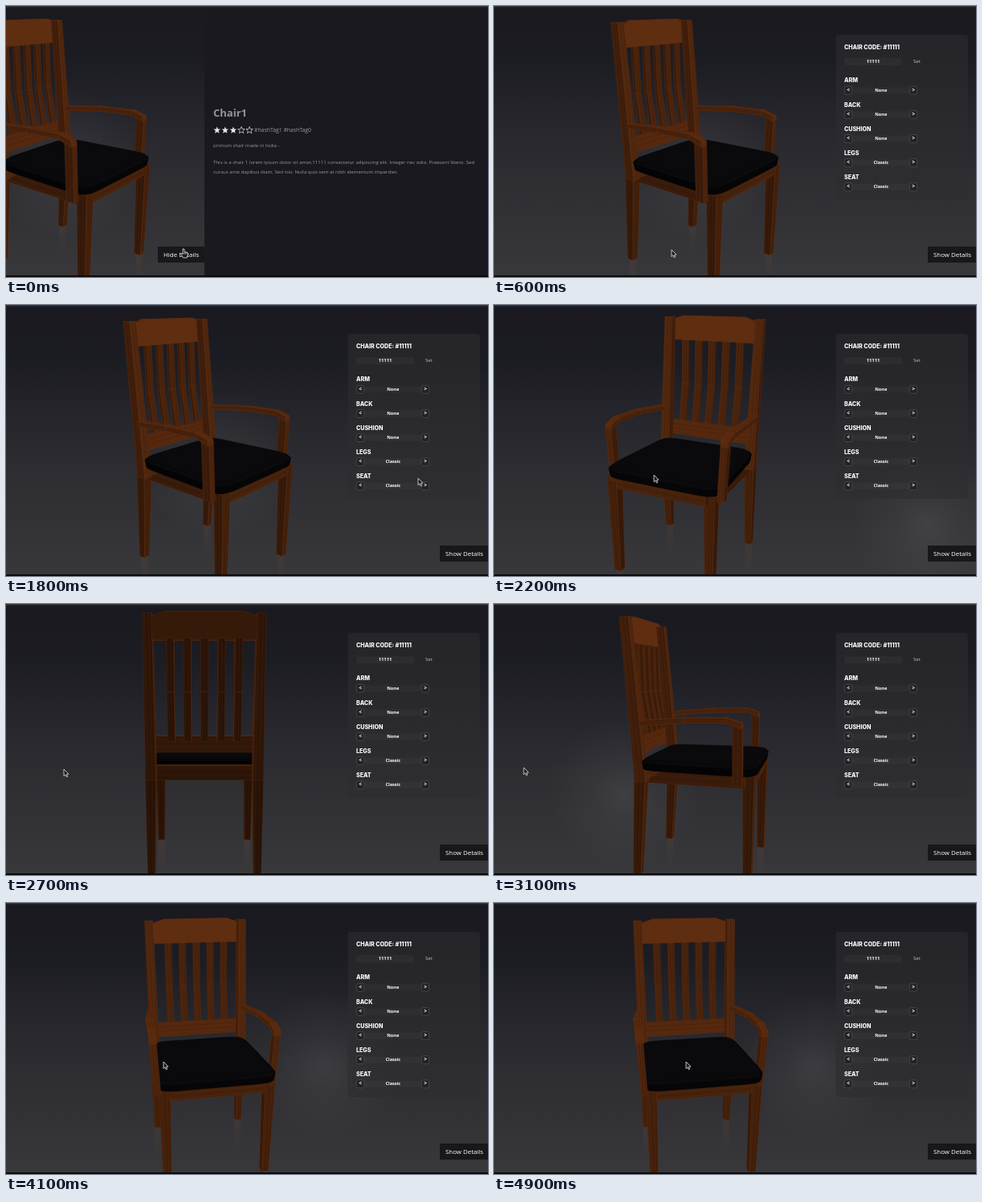
An HTML page with a canvas that plays this animation: 600x338 px, repeating every 5 s.

```html
<!DOCTYPE html>
<html lang="en">
<head>
<meta charset="utf-8">
<title>Chair configurator</title>
<style>
html, body { margin: 0; width: 100%; height: 100%; overflow: hidden; background: #1a191f; }
canvas { display: block; width: 600px; height: 338px; }
</style>
</head>
<body>
<canvas id="stage" width="600" height="338"></canvas>
<script>
const ctx = document.getElementById('stage').getContext('2d');
const LOOP = 5000, STEP = 100, HIDE_AT = 600;
const EYE_DISTANCE = 560, AXIS_X = 247, AXIS_Y = 168, DETAILS_SHIFT = -176.5;
const UI = '"Open Sans", "Noto Sans", sans-serif';
const HEADING = 'Inter, sans-serif';
const WOOD = [100, 48, 17], LEATHER = [12, 12, 15];

// time, yaw, pitch, zoom
const viewTrack = [
  [0, 51, 16, 1.045], [1700, 51, 16, 1.045], [1800, 48, 16, 1.045],
  [2200, -26, 18, 1.05], [2400, -92, 13, 1.05], [2700, -180, 6, 1.045],
  [2900, -235, 7, 1.045], [3100, -285, 8, 1.045], [3500, -290, 8, 1.04],
  [3700, -298, 11, 1.03], [4000, -343, 19, 1], [4100, -349, 20, 1], [4900, -350, 20, 1]
];
// time, x, y
const cursorTrack = [
  [0, 221, 304], [600, 221, 304], [1100, 318, 290], [1700, 385, 215],
  [1800, 513, 216], [2200, 199, 212], [2700, 72, 206], [2900, 12, 206],
  [3100, 37, 204], [3500, 482, 203], [3600, 482, 203], [4100, 196, 198],
  [4400, 497, 200], [4700, 310, 199], [4900, 239, 198]
];

function sample(track, t) {
  const i = track.findIndex(row => row[0] > t);
  if (i < 0) return track[track.length - 1].slice(1);
  const a = track[i - 1], b = track[i], f = (t - a[0]) / (b[0] - a[0]);
  return a.slice(1).map((v, j) => v + (b[j + 1] - v) * f);
}

// ---- vectors ----
const add = (a, b, m = 1) => a.map((v, i) => v + b[i] * m);
const dot = (a, b) => a[0] * b[0] + a[1] * b[1] + a[2] * b[2];
const cross = (a, b) => [a[1] * b[2] - a[2] * b[1], a[2] * b[0] - a[0] * b[2], a[0] * b[1] - a[1] * b[0]];
const mean = ps => ps.reduce((s, p) => add(s, p), [0, 0, 0]).map(v => v / ps.length);
const mix = (a, b, f) => add(a, add(b, a, -1), f);

// ---- model: x right, y up, z towards the front ----
function solid(ring0, ring1, color = WOOD, tone = 1) {
  const faces = ring0.map((p, i) => {
    const j = (i + 1) % ring0.length;
    return [p, ring0[j], ring1[j], ring1[i]];
  });
  faces.push(ring0, ring1);
  const center = mean([...ring0, ...ring1]);
  return { center, color, tone, faces: faces.map(points => {
    const mid = mean(points);
    let n = cross(add(points[1], points[0], -1), add(points[2], points[0], -1));
    const len = Math.hypot(...n) || 1;
    const sign = dot(n, add(mid, center, -1)) < 0 ? -1 : 1;
    return { points, mid, normal: n.map(v => v * sign / len) };
  }) };
}
function box(a, b, u, v, taper = 1, tone = 1) {
  const ring = (c, m) => [[-1, -1], [1, -1], [1, 1], [-1, 1]].map(([i, j]) => add(add(c, u, i * m), v, j * m));
  return solid(ring(a, taper), ring(b, 1), WOOD, tone);
}
const X = n => [n, 0, 0], Y = n => [0, n, 0], Z = n => [0, 0, n];
const backZ = y => -42 - 16 * (y + 25) / 164;
const sides = [-1, 1];

const frame = [
  ...sides.flatMap(s => [
    box([59 * s, -148, -48], [59 * s, -25, -42], X(6), Z(6.5), .68, .76),
    box([59 * s, -148, 77], [59 * s, -28, 77], X(6), Z(6), .72, .76),
    box([58 * s, -34, -38], [58 * s, -34, 72], X(4), Y(7.5), 1, .8)
  ]),
  box([-54, -34, 77], [54, -34, 77], Y(7), Z(4), 1, .8)
];

function crest() {
  const outline = [[-55, 110], [55, 110], [55, 134], [40, 139], [-40, 139], [-55, 134]];
  const ring = dz => outline.map(([x, y]) => [x, y, backZ(y) + dz]);
  return solid(ring(-3), ring(3), WOOD, 1.06);
}
const slats = [-36, -18, 0, 18, 36].flatMap(x => {
  const at = (y, bow) => [x, y, backZ(y) - bow];
  return [box(at(2, 0), at(56, 4), X(4), Z(2), 1, .82), box(at(56, 4), at(112, 0), X(4), Z(2), 1, .82)];
});
const back = [
  box([-56, -33, -43], [56, -33, -43], Y(8), Z(4), 1, .85),
  ...slats,
  box([-55, -1, backZ(0)], [55, -1, backZ(0)], Y(9), Z(3), 1, .95),
  crest(),
  ...sides.map(s => box([59 * s, -41, -42], [59 * s, 137, backZ(137)], X(4.8), Z(5.2), 1.2, .9))
];
const arms = sides.map(s => ({ side: s, parts: [
  box([66 * s, -38, 66], [69 * s, 26, 66], X(3.5), Z(5), 1, .85),
  box([62 * s, 24, -42], [68 * s, 29, 10], X(4), Y(2.8)),
  box([68 * s, 29, 10], [69 * s, 30, 54], X(4), Y(2.8)),
  box([69 * s, 30, 54], [69 * s, 25, 70], X(4), Y(3))
] }));

const round = v => Math.sign(v) * Math.abs(v) ** .22;
const cushionRing = (y, grow) => Array.from({ length: 56 }, (_, i) => {
  const a = i / 56 * Math.PI * 2, u = round(Math.cos(a)), v = round(Math.sin(a));
  return [u * (65 + 3 * v + grow), y, 20 + v * (64 + grow)];
});
const cushion = [
  solid(cushionRing(-28, 0), cushionRing(-20, 1), LEATHER, .55),
  solid(cushionRing(-20, 1), cushionRing(-17, -2), LEATHER, 1)
];

// ---- camera and painting ----
function makeCamera([yaw, pitch, zoom], cx) {
  const r = Math.PI / 180;
  const s = Math.sin(yaw * r), c = Math.cos(yaw * r), sp = Math.sin(pitch * r), cp = Math.cos(pitch * r);
  return {
    front: c > 0,
    eye: [-s * cp, sp, c * cp].map(v => v * EYE_DISTANCE),
    project([x, y, z]) {
      const px = x * c + z * s, pz = z * c - x * s;
      const scale = zoom * EYE_DISTANCE / (EYE_DISTANCE - pz * cp - y * sp);
      return [cx + px * scale, AXIS_Y - (y * cp - pz * sp) * scale];
    }
  };
}
function trace(points) {
  ctx.beginPath();
  points.forEach(p => ctx.lineTo(...p));
  ctx.closePath();
}
function line(a, b) {
  ctx.beginPath();
  ctx.moveTo(...a);
  ctx.lineTo(...b);
  ctx.stroke();
}
function grain(cam, q) {
  for (let i = 1; i < 5; i++) {
    const f = i / 5 + .06 * Math.sin(i * 7 + q[0][1]);
    ctx.strokeStyle = i % 2 ? 'rgba(30,10,2,.16)' : 'rgba(150,75,30,.12)';
    const long = Math.hypot(...add(q[1], q[0], -1)) > Math.hypot(...add(q[3], q[0], -1));
    const [a, b, c, d] = long ? [q[0], q[3], q[1], q[2]] : [q[0], q[1], q[3], q[2]];
    line(cam.project(mix(a, b, f)), cam.project(mix(c, d, f)));
  }
}
function paint(cam, part) {
  ctx.lineWidth = .6;
  for (const face of part.faces) {
    if (dot(face.normal, add(cam.eye, face.mid, -1)) <= 0) continue;
    const [, ny, nz] = face.normal;
    const light = part.tone * (.7 + .18 * nz + .15 * ny);
    const fill = `rgb(${part.color.map(v => Math.round(v * light)).join()})`;
    trace(face.points.map(cam.project));
    ctx.fillStyle = fill;
    ctx.fill();
    ctx.strokeStyle = part.color === WOOD ? 'rgba(112,56,22,.4)' : fill;
    ctx.stroke();
    if (part.color === WOOD && face.points.length === 4) grain(cam, face.points);
  }
}
function paintSorted(cam, parts) {
  const distance = p => Math.hypot(...add(p.center, cam.eye, -1));
  [...parts].sort((a, b) => distance(b) - distance(a)).forEach(p => paint(cam, p));
}
function paintReflections(cam) {
  for (const x of [-59, 59]) for (const z of [-48, 77]) {
    const [px, py] = cam.project([x, -148, z]);
    const g = ctx.createLinearGradient(0, py, 0, py + 38);
    g.addColorStop(0, 'rgba(110,70,50,.22)');
    g.addColorStop(1, 'rgba(110,70,50,0)');
    ctx.fillStyle = g;
    ctx.fillRect(px - 4, py - 2, 8, 40);
  }
}
function paintFloorGlow(cam) {
  const [x, y] = cam.project([270, -148, -206]);
  const g = ctx.createRadialGradient(x, y, 0, x, y, 95);
  g.addColorStop(0, 'rgba(255,255,255,.075)');
  g.addColorStop(.4, 'rgba(255,255,255,.035)');
  g.addColorStop(1, 'rgba(255,255,255,0)');
  ctx.fillStyle = g;
  ctx.fillRect(x - 95, y - 95, 190, 190);
}
function paintChair(cam) {
  const isNear = arm => arm.side * cam.eye[0] > 60;
  const far = arms.filter(a => !isNear(a)).flatMap(a => a.parts);
  const near = arms.filter(isNear).flatMap(a => a.parts);
  paintReflections(cam);
  paintSorted(cam, frame);
  if (cam.front) back.forEach(p => paint(cam, p));
  paintSorted(cam, far);
  cushion.forEach(p => paint(cam, p));
  paintSorted(cam, near);
  if (!cam.front) paintSorted(cam, back);
}

// ---- interface ----
function rect(x, y, w, h, fill, radius = 0, stroke) {
  ctx.beginPath();
  ctx.roundRect(x, y, w, h, radius);
  ctx.fillStyle = fill;
  ctx.fill();
  if (stroke) { ctx.strokeStyle = stroke; ctx.lineWidth = .6; ctx.stroke(); }
}
function text(str, x, y, font, color = '#fff', align = 'left') {
  ctx.font = font;
  ctx.fillStyle = color;
  ctx.textAlign = align;
  ctx.textBaseline = 'middle';
  ctx.fillText(str, x, y);
}
function button(label, x, w) {
  rect(x, 300, w, 20, '#18181c');
  text(label, x + 7, 310.5, `7.9px ${UI}`, '#fff');
}
function star(cx, cy, filled) {
  trace(Array.from({ length: 10 }, (_, i) => {
    const a = (i / 5 - .5) * Math.PI, r = i % 2 ? 2 : 4.5;
    return [cx + r * Math.cos(a), cy + r * Math.sin(a)];
  }));
  ctx.fillStyle = ctx.strokeStyle = '#e6e6e8';
  ctx.lineWidth = .7;
  if (filled) ctx.fill(); else ctx.stroke();
}
function paintRoom(width) {
  const g = ctx.createLinearGradient(0, 3, 0, 336);
  [[0, '#19191f'], [.2, '#1c1c23'], [.4, '#25252b'], [.62, '#2d2d32'], [1, '#38383b']]
    .forEach(stop => g.addColorStop(...stop));
  ctx.fillStyle = g;
  ctx.fillRect(0, 0, width, 338);
}
function paintDetails() {
  rect(247, 0, 353, 338, '#1a191f');
  text('Chair1', 258, 134.5, `bold 13px ${UI}`, '#96969a');
  for (let i = 0; i < 5; i++) star(262.7 + i * 10.1, 155, i < 3);
  const gray = '#99999d', body = `6.1px ${UI}`;
  text('#hashTag1 #hashTag0', 309, 155, `6.85px ${UI}`, gray);
  text('primum chair made in India -', 258, 174.5, body, gray);
  text('This is a chair 1 lorem ipsum dolor sit amet,11111 consectetur adipiscing elit. Integer nec odio. Praesent libero. Sed', 258, 195, body, gray);
  text('cursus ante dapibus diam. Sed nisi. Nulla quis sem at nibh elementum imperdiet.', 258, 207.7, body, gray);
  button('Hide Details', 189, 58);
}
function paintOptions() {
  rect(425.5, 36, 164.5, 206, 'rgba(45,44,48,.6)', 4);
  const title = `800 7.1px ${HEADING}`, value = `bold 5.6px ${UI}`;
  text('CHAIR CODE: #11111', 436, 51.5, title);
  rect(436, 65, 72, 9, 'rgba(255,255,255,.03)', 2);
  text('11111', 472, 69.5, `bold 5.8px ${UI}`, '#fff', 'center');
  text('Set', 522, 69.5, `6px ${UI}`, '#c4c4c6');
  ['ARM', 'BACK', 'CUSHION', 'LEGS', 'SEAT'].forEach((name, i) => {
    const y = 93.3 + i * 30.1, row = y + 12;
    text(name, 436, y, title);
    rect(446, row - 4, 71, 8, 'rgba(255,255,255,.025)');
    text(i < 3 ? 'None' : 'Classic', 481.8, row, value, '#fff', 'center');
    [['<', 441], ['>', 522]].forEach(([sign, x]) => {
      rect(x - 4.7, row - 5, 9.4, 10, '#232327', 2, '#58585c');
      text(sign, x, row, `bold 6.5px ${UI}`, '#fff', 'center');
    });
  });
  button('Show Details', 540, 60);
}
function paintCursor(x, y, hand) {
  ctx.save();
  ctx.translate(x, y);
  const arrow = [[0, 0], [0, 8.6], [2, 6.8], [3.3, 9.8], [4.7, 9.2], [3.4, 6.3], [6, 6.1]];
  const pointer = [[-1, -1], [.8, -1], [1.2, 2.5], [5, 3.5], [5.3, 6.5], [4.2, 10], [-.5, 10], [-3.2, 5.5], [-2.4, 4.5], [-.8, 5.5]];
  trace(hand ? pointer : arrow);
  ctx.fillStyle = '#1c1c20';
  ctx.strokeStyle = '#d8d8da';
  ctx.lineWidth = .85;
  ctx.fill();
  ctx.stroke();
  if (hand) [1.2, 3].forEach(dx => line([dx, 3], [dx, 5.5]));
  ctx.restore();
}

function draw(t) {
  const details = t < HIDE_AT;
  const cam = makeCamera(sample(viewTrack, t), AXIS_X + (details ? DETAILS_SHIFT : 0));
  ctx.lineJoin = 'round';
  paintRoom(details ? 247 : 600);
  paintFloorGlow(cam);
  paintChair(cam);
  if (details) paintDetails(); else paintOptions();
  rect(0, 0, 600, 1.6, '#39393c');
  rect(0, 1.6, 600, 1, '#202024');
  rect(0, 336, 600, 2, '#0b0b0d');
  paintCursor(...sample(cursorTrack, t), details);
}

const start = performance.now();
function tick() {
  const t = (performance.now() - start) % LOOP;
  draw(Math.floor(t / STEP) * STEP);
  requestAnimationFrame(tick);
}
tick();
</script>
</body>
</html>
```
